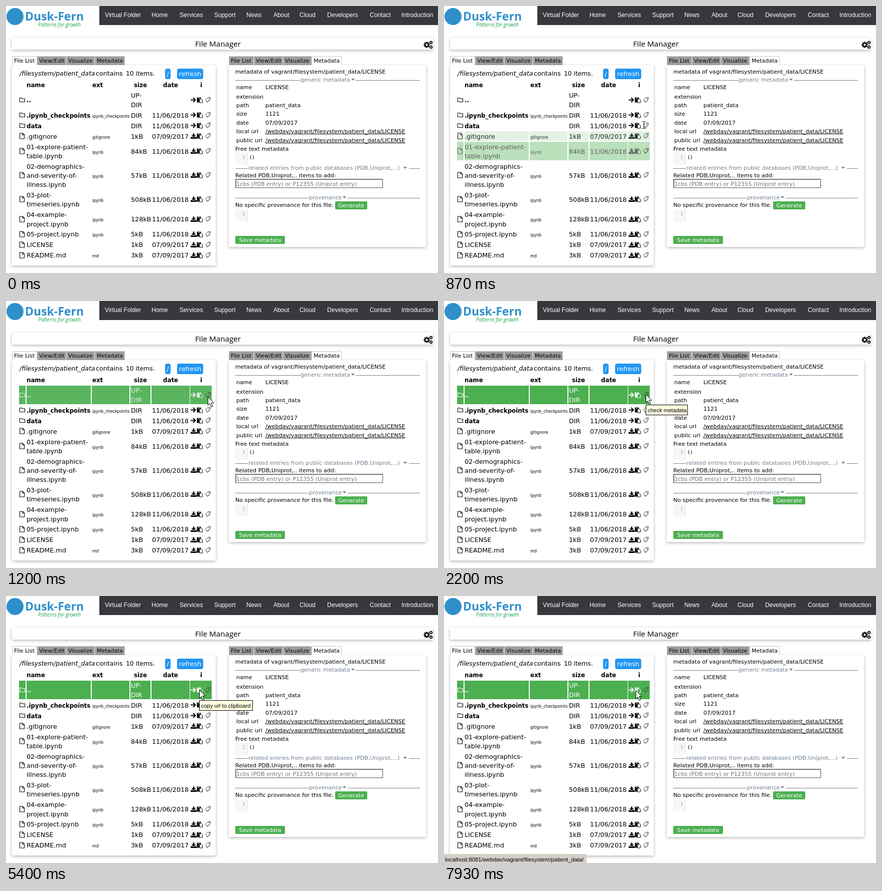
An HTML page with a canvas that plays this animation: 861 px wide and 533 px high, repeating every 8 s.

```html
<!DOCTYPE html>
<html lang="en">
<head>
<meta charset="utf-8">
<title>File Manager</title>
<style>
  html, body { margin: 0; width: 100%; height: 100%; overflow: hidden; background: #fff; }
  canvas { display: block; }
</style>
</head>
<body>
<canvas id="stage" width="861" height="533"></canvas>
<script>
const ctx = document.getElementById('stage').getContext('2d');
const LOOP = 8000, TICK = 1000 / 15, FADE = 300;
const SANS = '"DejaVu Sans", sans-serif', ARIAL = '"Liberation Sans", sans-serif';
const MONO = '"DejaVu Sans Mono", monospace', HUMAN = '"Open Sans", sans-serif';
const GREEN = '#4caf50', BLUE = '#2196f3', SLATE = '#708090';
const BODY = '12.7px ' + SANS, BOLD = 'bold 11.8px ' + SANS, SMALL = '11.1px ' + SANS;
const TINY = '8px ' + SANS, TIP = '11px ' + ARIAL;

const rows = [
  { kind: 'folder', name: ['..'], size: ['UP-', 'DIR'], bold: true, enter: 1000, leave: 1e6 },
  { kind: 'folder', name: ['.ipynb_checkpoints'], ext: 'ipynb_checkpoints', size: ['DIR'], date: '11/06/2018', bold: true, enter: 930, leave: 1000 },
  { kind: 'folder', name: ['data'], size: ['DIR'], date: '11/06/2018', bold: true, enter: 868, leave: 930 },
  { name: ['.gitignore'], ext: 'gitignore', size: ['1kB'], date: '07/09/2017', enter: 845, leave: 868 },
  { name: ['01-explore-patient-', 'table.ipynb'], ext: 'ipynb', size: ['84kB'], date: '11/06/2018', enter: 700, leave: 820 },
  { name: ['02-demographics-', 'and-severity-of-', 'illness.ipynb'], ext: 'ipynb', size: ['57kB'], date: '11/06/2018' },
  { name: ['03-plot-', 'timeseries.ipynb'], ext: 'ipynb', size: ['508kB'], date: '11/06/2018' },
  { name: ['04-example-', 'project.ipynb'], ext: 'ipynb', size: ['128kB'], date: '11/06/2018' },
  { name: ['05-project.ipynb'], ext: 'ipynb', size: ['5kB'], date: '11/06/2018' },
  { name: ['LICENSE'], size: ['1kB'], date: '07/09/2017' },
  { name: ['README.md'], ext: 'md', size: ['3kB'], date: '07/09/2017' }
];
const cells = [[26, 39], [41, 169], [171, 246], [248, 288], [290, 366], [367, 410]];

// Pointer path: tick, x, y
const path = [
  [0, 860, 532], [4, 860, 532], [5, 846, 523], [8, 640, 420], [10, 450, 330], [11, 409, 304],
  [12, 401, 278], [13, 398, 237], [14, 400, 217], [15, 402, 200], [16, 402, 194], [17, 402, 191],
  [23, 402, 191], [24, 402, 186], [67, 402, 186], [68, 400, 185], [70, 393, 185], [73, 385, 187],
  [98, 385, 187], [99, 384, 185], [101, 379, 180], [104, 372, 187], [116, 372, 187],
  [117, 375, 187], [119, 382, 188]
];
const tips = [
  { from: 33, to: 69, x: 402, y: 207, w: 84, label: 'check metadata' },
  { from: 81, to: 99, x: 385, y: 208, w: 107, label: 'copy url to clipboard' },
  { from: 112, to: 117, x: 372, y: 209, w: 122, label: 'change to this directory' }
];

const clamp = v => Math.max(0, Math.min(1, v));
const ease = u => 1 - Math.pow(1 - clamp(u), 2.3);
const mix = (a, b, k) => `rgb(${a.map((v, i) => Math.round(v + (b[i] - v) * k))})`;

function text(s, x, y, font = SMALL, color = '#000', align = 'left') {
  ctx.font = font;
  ctx.fillStyle = color;
  ctx.textAlign = align;
  ctx.fillText(s, x, y);
}
function box(x, y, w, h, color) {
  ctx.fillStyle = color;
  ctx.fillRect(x, y, w, h);
}
function trace(points, close = true) {
  ctx.beginPath();
  points.forEach(([x, y]) => ctx.lineTo(x, y));
  if (close) ctx.closePath();
}
function disc(x, y, r, color) {
  ctx.fillStyle = color;
  ctx.beginPath();
  ctx.arc(x, y, r, 0, 7);
  ctx.fill();
}
function shape(points, fill, stroke, width = 1) {
  trace(points);
  if (fill) { ctx.fillStyle = fill; ctx.fill(); }
  if (stroke) { ctx.strokeStyle = stroke; ctx.lineWidth = width; ctx.stroke(); }
}
function button(label, x, y, w, h, color, font, baseline) {
  ctx.fillStyle = color;
  ctx.beginPath();
  ctx.roundRect(x, y, w, h, h > 18 ? 4 : 2);
  ctx.fill();
  text(label, x + w / 2, baseline, font, '#fff', 'center');
}
function card(x, y, w, h) {
  ctx.save();
  ctx.shadowColor = 'rgba(0,0,0,.28)';
  ctx.shadowBlur = 6;
  ctx.shadowOffsetY = 2;
  box(x, y, w, h, '#fff');
  ctx.restore();
}
function at(x, y, draw) {
  ctx.save();
  ctx.translate(x, y);
  draw();
  ctx.restore();
}

function gear(x, y, r) {
  ctx.strokeStyle = '#111';
  ctx.lineWidth = r * 0.48;
  for (let i = 0; i < 4; i++) {
    const a = i * Math.PI / 4, c = Math.cos(a) * r, s = Math.sin(a) * r;
    trace([[x - c, y - s], [x + c, y + s]], false);
    ctx.stroke();
  }
  disc(x, y, r * 0.78, '#111');
  disc(x, y, r * 0.36, '#fff');
}

function header() {
  disc(18, 21, 17, '#2f8fcb');
  text('Dusk-Fern', 38, 29, 'bold 23px ' + HUMAN, '#2f8fcb');
  text('Patterns for growth', 64, 41, 'italic 10px ' + HUMAN, '#1da34c');
  box(186, 0, 675, 38, '#37383c');
  const menu = [['Virtual Folder', 197], ['Home', 290], ['Services', 346], ['Support', 415], ['News', 479],
    ['About', 533], ['Cloud', 585], ['Developers', 640], ['Contact', 725], ['Introduction', 788]];
  menu.forEach(([s, x]) => text(s, x, 22, '12.15px ' + ARIAL, '#fff'));
  card(12, 63, 839, 24);
  text('File Manager', 377, 81, '15.2px ' + HUMAN);
  gear(838.5, 77.5, 6);
  gear(847, 73, 3.4);
  gear(847, 82, 3.4);
}

function tabs(left, active) {
  const widths = [50, 58, 57, 60];
  ['File List', 'View/Edit', 'Visualize', 'Metadata'].forEach((label, i) => {
    const w = widths[i];
    box(left, 100, w, 18, '#c8c8c8');
    box(left + 1, 101, w - 2, i === active ? 18 : 17, i === active ? '#fff' : '#9e9e9e');
    text(label, left + 4, 113, '11px ' + SANS);
    left += w;
  });
}

function entryIcon(kind, y, color, fill) {
  if (kind) {
    shape([[27.5, y - 4], [31.5, y - 4], [32.5, y - 2.5], [37.5, y - 2.5], [37.5, y + 4], [27.5, y + 4]], fill, color, 1.1);
  } else {
    shape([[27.5, y - 5.5], [33.5, y - 5.5], [36.5, y - 2.5], [36.5, y + 5.5], [27.5, y + 5.5]], fill, color, 1.1);
    trace([[33, y - 5.5], [33, y - 2], [36.5, y - 2]], false);
    ctx.stroke();
  }
}

function actionIcons(kind, y, color, fill) {
  ctx.strokeStyle = color;
  if (kind) {
    ctx.lineWidth = 2;
    trace([[368, y], [377, y]], false);
    ctx.stroke();
    trace([[373, y - 4.5], [377.5, y], [373, y + 4.5]], false);
    ctx.stroke();
  } else {
    box(372.5, y - 5, 3, 4, color);
    shape([[369.5, y - 1.5], [378.5, y - 1.5], [374, y + 3]], color);
    box(368, y + 2, 12, 3.5, color);
    box(372.5, y + 2, 3, 1, fill);
  }
  box(380.5, y - 5, 8, 10, color);
  box(382.5, y - 4, 4, 1, fill);
  shape([[385.5, y - 2], [389, y - 2], [391.5, y + 0.5], [391.5, y + 5.5], [385.5, y + 5.5]], fill, color);
  shape([[397.5, y], [402.5, y - 5], [407.5, y - 5], [406.5, y - 1], [401.5, y + 4]], null, '#444');
  trace([[398.5, y + 2], [401.5, y + 5.3], [407.5, y - 0.5]], false);
  ctx.lineWidth = 0.7;
  ctx.stroke();
  disc(404.6, y - 2.8, 0.9, '#333');
}

function hover(row, time) {
  if (row.enter === undefined || time < row.enter) return 0;
  if (time < row.leave) return ease((time - row.enter) / FADE);
  const peak = ease((row.leave - row.enter) / FADE);
  return peak * (1 - ease((time - row.leave) / (FADE * peak)));
}

function fileList(time) {
  card(12, 118, 406, 400);
  tabs(12, 0);
  text('/filesystem/patient_data', 27, 139, 'italic 12.4px ' + SANS);
  text('contains', 179, 139, BODY);
  text('10 items.', 239, 139, '12.3px ' + SANS);
  button('/', 317, 125, 11, 21, BLUE, BODY, 140);
  button('refresh', 341, 125, 52, 21, BLUE, BODY, 140);
  [['name', 41], ['ext', 172], ['size', 255], ['date', 313], ['i', 387]]
    .forEach(([s, x]) => text(s, x, 162, BOLD));

  const line = 18.2;
  let top = 169;
  for (const row of rows) {
    const count = Math.max(row.name.length, row.size.length), height = count * line + 0.8;
    const middle = top + height / 2, y = Math.round(middle) - 0.5, k = hover(row, time);
    const fill = mix([255, 255, 255], [76, 175, 80], k), color = mix([0, 0, 0], [255, 255, 255], k);
    const lines = (list, x, font) => list.forEach((s, i) =>
      text(s, x, Math.round(middle + (i - (list.length - 1) / 2) * line + 4.8), font, color));
    if (k > 0) {
      const a = Math.round(top), b = Math.round(top + height);
      cells.forEach(([l, r]) => box(l, a, r - l, b - a, fill));
    }
    entryIcon(row.kind, y, color, fill);
    lines(row.name, 41, row.bold ? BOLD : BODY);
    if (row.ext) lines([row.ext], 172, TINY);
    lines(row.size, 249, BODY);
    if (row.date) lines([row.date], 291, BODY);
    actionIcons(row.kind, y, color, fill);
    top += height + 2;
  }
}

function legend(label, x, y, leftEnd, caret, rightStart) {
  box(457, y, leftEnd - 457, 1, '#808080');
  box(rightStart, y, 825 - rightStart, 1, '#808080');
  text(label, x, y + 3, SMALL, SLATE);
  shape([[caret, y - 3], [caret + 7, y - 3], [caret + 3.5, y + 1]], SLATE);
}
function editor(y) {
  box(457, y, 24, 24, '#f7f7f7');
  box(480, y, 1, 24, '#ddd');
  text('1', 471, y + 12, '9px ' + MONO, '#999');
}

function metadata() {
  card(444, 118, 393, 363);
  tabs(444, 3);
  text('metadata of vagrant/filesystem/patient_data/LICENSE', 457, 135);
  legend('generic metadata', 587, 148, 587, 688, 697);
  const url = '/webdav/vagrant/filesystem/patient_data/LICENSE';
  [['name', 'LICENSE', 166], ['extension', '', 185], ['path', 'patient_data', 202], ['size', '1121', 219],
    ['date', '07/09/2017', 237], ['local url', url, 254], ['public url', url, 272]].forEach(([key, value, y]) => {
    text(key, 459, y);
    text(value, 517, y);
    if (value === url) box(517, y + 1, ctx.measureText(url).width, 1, '#000');
  });
  text('Free text metadata', 457, 289);
  editor(293);
  text('{}', 485, 305, '9px ' + MONO);
  legend('related entries from public databases (PDB,Uniprot,...)', 483, 324, 482, 792, 803);
  text('Related PDB,Uniprot,.. items to add:', 457, 342);
  box(457, 345, 295, 19, '#d0d0d0');
  box(457, 345, 294, 18, '#777');
  box(459, 347, 291, 15, '#fff');
  text('1cbs (PDB entry) or P12355 (Uniprot entry)', 459, 359, SMALL, '#757575');
  legend('provenance', 604, 383, 603, 671, 681);
  text('No specific provenance for this file.', 457, 401);
  button('Generate', 656, 390, 64, 16, GREEN, '11px ' + SANS, 402);
  editor(406);
  button('Save metadata', 457, 459, 99, 16, GREEN, '11px ' + SANS, 471);
}

function arrowCursor() {
  shape([[0.5, 0.5], [0.5, 17], [4.3, 13.6], [7, 20.3], [9.8, 19.2], [7, 12.6], [12, 12.3]], '#fff', '#000');
}
function handCursor() {
  shape([[1.5, 1], [3, 0.5], [4.5, 1.5], [4.5, 7], [7, 6.8], [8, 8], [10, 8], [11.2, 9.5], [11.5, 14],
    [9.5, 17.5], [9.5, 20.5], [0, 20.5], [-0.5, 17.5], [-3.8, 12.5], [-4, 10.5], [-2, 10.5], [1.5, 13.5]], '#fff', '#000');
  trace([[4.5, 7], [4.5, 11]], false);
  ctx.stroke();
  trace([[7.7, 8], [7.7, 11.5]], false);
  ctx.stroke();
}
function textCursor() {
  ctx.strokeStyle = '#000';
  ctx.lineWidth = 1;
  trace([[-3, -6.5], [-0.5, -6.5], [0.5, -5.5], [0.5, 6], [-0.5, 7.5], [-3, 7.5]], false);
  ctx.stroke();
  trace([[4, -6.5], [1.5, -6.5], [0.5, -5.5], [0.5, 6], [1.5, 7.5], [4, 7.5]], false);
  ctx.stroke();
}

function pointer(tick) {
  const i = path.findIndex(p => p[0] >= tick);
  const [t1, x1, y1] = path[i], [t0, x0, y0] = path[Math.max(0, i - 1)];
  const k = t1 === t0 ? 1 : (tick - t0) / (t1 - t0);
  const draw = tick === 13 ? textCursor : tick >= 103 && tick < 117 ? handCursor : arrowCursor;
  at(Math.round(x0 + (x1 - x0) * k), Math.round(y0 + (y1 - y0) * k), draw);
}

function overlays(tick) {
  if (tick > 104) {
    ctx.globalAlpha = Math.pow(clamp((tick - 104) / 3), 1.4);
    box(0, 515, 284, 18, '#d4d0c8');
    text('localhost:8081/webdav/vagrant/filesystem/patient_data/', 2, 530, '11.25px ' + ARIAL);
    ctx.globalAlpha = 1;
  }
  const tip = tips.find(t => tick >= t.from && tick < t.to);
  if (!tip) return;
  box(tip.x, tip.y, tip.w, 21, '#000');
  box(tip.x + 1, tip.y + 1, tip.w - 2, 19, '#ffffe1');
  text(tip.label, tip.x + 4, tip.y + 15, TIP);
}

function render(tick) {
  box(0, 0, 861, 533, '#fff');
  header();
  fileList(tick * TICK);
  metadata();
  overlays(tick);
  pointer(tick);
}

let shown = -1;
const start = performance.now();
function loop() {
  const time = (performance.now() - start) % LOOP;
  const tick = Math.min(119, Math.floor((time + 5) / TICK));
  if (tick !== shown) render(shown = tick);
  requestAnimationFrame(loop);
}
loop();
</script>
</body>
</html>
```
